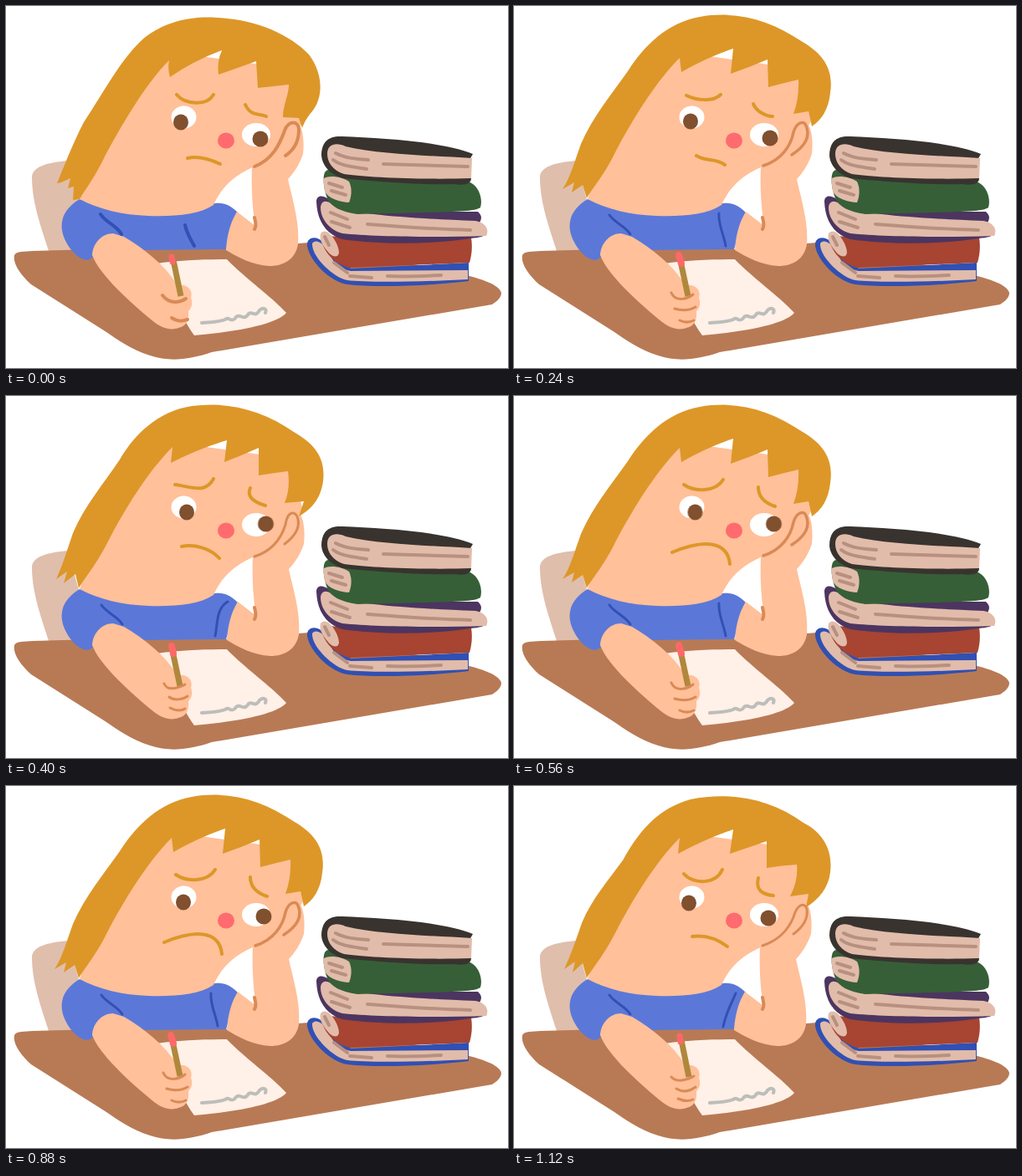
An HTML page without scripts that plays this animation: 600 px wide and 433 px high, repeating every 1200 ms.

```html
<!DOCTYPE html>
<html lang="en">
<head>
<meta charset="utf-8">
<title>Tired student</title>
<style>
html, body { margin: 0; width: 100%; height: 100%; overflow: hidden; background: #fff; }
svg { display: block; width: 100vw; height: 100vh; }
.skin { fill: #ffc09a; }
.hair { fill: #dd9728; }
.page { fill: #e2bcaa; }
.line { fill: none; stroke-linecap: round; stroke-linejoin: round; stroke-width: 4; }
.print { stroke: #b8907f; }
.fold { stroke: #3350b5; stroke-width: 3; }
.crease { stroke: #d98a55; }
.brow { stroke: #dd9728; }
.pencil { stroke: #b0883c; stroke-width: 7; stroke-linecap: butt; }
.rubber { stroke: #ff6868; stroke-width: 8; }

/* four hand-drawn poses take turns, 80 ms each */
.pose { visibility: hidden; animation: 1.2s step-end infinite; }
#p1 { animation-name: p1; }
#p2 { animation-name: p2; }
#p3 { animation-name: p3; }
#p4 { animation-name: p4; }
@keyframes p1 {
  0%, 26.66%, 53.33%, 80% { visibility: visible; }
  6.66%, 33.33%, 60%, 86.66%, 100% { visibility: hidden; }
}
@keyframes p2 {
  6.66%, 33.33%, 60%, 86.66% { visibility: visible; }
  0%, 13.33%, 40%, 66.66%, 93.33%, 100% { visibility: hidden; }
}
@keyframes p3 {
  13.33%, 40%, 66.66%, 93.33% { visibility: visible; }
  0%, 20%, 46.66%, 73.33%, 100% { visibility: hidden; }
}
@keyframes p4 {
  20%, 46.66%, 73.33% { visibility: visible; }
  0%, 26.66%, 53.33%, 80%, 100% { visibility: hidden; }
}

/* face parts move between key poses in 80 ms steps */
.move { animation: 1.2s infinite; }
#mouth { animation-name: mouth; }
#browL { animation-name: browL; }
#browR { animation-name: browR; }
#pupilL { animation-name: pupilL; }
#pupilR { animation-name: pupilR; }
@keyframes mouth {
  0% { d: path("M217 182C230 179 243 183 256 189"); animation-timing-function: steps(3); }
  20% { d: path("M218 179C231 187 239 181 252 190"); animation-timing-function: steps(2); }
  33.33% { d: path("M210 180C225 177 244 182 255 194"); animation-timing-function: steps(2); }
  46.66% { d: path("M189 187C225 172 255 172 258 201"); animation-timing-function: steps(2); }
  60% { d: path("M193 186C225 170 258 171 258 203"); animation-timing-function: steps(2); }
  73.33% { d: path("M189 187C225 172 255 172 258 201"); animation-timing-function: steps(3); }
  93.33%, 100% { d: path("M213 180C228 178 243 183 255 192"); animation-timing-function: step-end; }
}
@keyframes browL {
  0% { d: path("M204 106C214 118 240 120 248 106"); animation-timing-function: steps(3); }
  20% { d: path("M206 107C218 113 238 115 247 106"); animation-timing-function: steps(2); }
  33.33% { d: path("M202 106C220 108 238 118 248 99"); animation-timing-function: steps(2); }
  46.66% { d: path("M203 106C216 115 241 115 250 100"); animation-timing-function: steps(2); }
  60% { d: path("M202 106C220 108 238 118 248 99"); animation-timing-function: steps(2); }
  73.33% { d: path("M203 106C216 115 241 115 250 100"); animation-timing-function: steps(3); }
  93.33%, 100% { d: path("M203 105C214 118 241 118 249 100"); animation-timing-function: step-end; }
}
@keyframes browR {
  0% { d: path("M286 118C293 133 303 128 311 132"); animation-timing-function: steps(3); }
  20% { d: path("M286 117C289 125 300 132 309 132"); animation-timing-function: steps(2); }
  33.33% { d: path("M292 110C286 123 303 129 310 131"); animation-timing-function: steps(2); }
  46.66%, 73.33% { d: path("M292 109C292 123 303 129 312 132"); animation-timing-function: steps(3); }
  93.33%, 100% { d: path("M292 110C288 126 299 130 310 131"); animation-timing-function: step-end; }
}
@keyframes pupilL {
  0% { transform: translate(209px, 139px); animation-timing-function: steps(3); }
  20% { transform: translate(211px, 138px); animation-timing-function: steps(2); }
  33.33% { transform: translate(216px, 139px); animation-timing-function: steps(2); }
  46.66%, 60% { transform: translate(216.5px, 139px); animation-timing-function: steps(2); }
  73.33% { transform: translate(212px, 139px); animation-timing-function: steps(3); }
  93.33%, 100% { transform: translate(209px, 140px); animation-timing-function: step-end; }
}
@keyframes pupilR {
  0% { transform: translate(304px, 159px); animation-timing-function: steps(3); }
  20% { transform: translate(306px, 158px); animation-timing-function: steps(2); }
  33.33%, 46.66%, 60% { transform: translate(310.5px, 153px); animation-timing-function: steps(2); }
  73.33% { transform: translate(308px, 156px); animation-timing-function: steps(3); }
  93.33%, 100% { transform: translate(304px, 158px); animation-timing-function: step-end; }
}
</style>
</head>
<body>
<svg viewBox="0 0 600 433" preserveAspectRatio="none">
  <defs>
    <path id="arm" class="skin" d="M300 188L345 136C355 139 358 157 356 177C352 189 345 200 338 207C343 230 352 258 350 285C347 303 333 311 316 311C296 310 277 300 264 292C265 275 269 259 277 246L299 263C295 240 294 215 295 192Z"/>
    <path id="elbow" class="line crease" stroke-width="3" d="M297 253C298 258 300 263 297 267"/>
  </defs>

  <path fill="#e0beac" d="M31 205C31 192 50 187 74 185L104 293L51 293C42 265 31 235 31 205Z"/>
  <path fill="#b87a55" d="M10 298C12 293 22 294 32 293L104 291L262 291L362 283L540 320C570 326 590 334 592 343C592 349 587 353 581 357L246 414C220 423 195 426 172 418C150 411 133 399 120 390L30 333C17 321 8 308 10 298Z"/>
  <path fill="#fff0e8" d="M180 308C205 304 240 303 264 303C285 325 318 348 335 367C322 382 270 390 225 394C215 380 203 358 193 332Z"/>
  <path class="line" stroke="#bdbdba" d="M234 379C245 378 255 378 262 375C267 370 269 381 275 372C280 367 284 378 290 368C295 365 298 373 303 364C307 360 312 362 310 367"/>

  <g id="books">
    <path fill="#3050b3" d="M360 287C359 276 371 274 380 283L412 314L553 307L553 329C505 335 440 337 408 333C388 330 363 306 360 287Z"/>
    <path class="page" d="M366 284C370 277 382 285 387 297C392 309 401 315 412 317L552 316L552 327C500 330 430 331 408 328C392 325 365 300 366 284Z"/>
    <path fill="#a74432" d="M376 274L470 283L556 277C558 290 556 300 554 307L460 311L410 313C393 308 378 295 376 274Z"/>
    <path class="page" d="M376 272C384 262 398 284 398 295C397 303 388 299 384 293C379 287 374 280 376 272Z"/>
    <path fill="#4c3560" d="M371 234C371 225 381 225 391 236L420 246L564 246C571 252 567 257 565 261L574 270C573 276 566 277 555 278C510 285 450 286 402 279C385 274 372 260 371 234Z"/>
    <path class="page" d="M376 241C377 230 386 233 396 241C420 249 480 254 561 257C573 259 578 267 574 275C510 277 440 276 402 272C386 268 376 254 376 241Z"/>
    <path fill="#365f38" d="M381 199C384 193 395 195 406 205L555 211C566 217 570 231 567 241C558 247 530 246 420 249C400 246 388 240 384 230C380 220 378 206 381 199Z"/>
    <path class="page" d="M379 207C383 202 401 203 410 210C414 218 413 228 410 235C400 235 385 230 381 222Z"/>
    <path fill="#39332f" d="M377 179C377 162 386 155 402 156C450 158 522 162 558 177L554 184L556 206C556 213 548 215 535 213C500 215 420 208 402 206C387 201 378 191 377 179Z"/>
    <path class="page" d="M384 177C384 164 396 163 406 168C450 178 510 179 557 182L556 206C500 208 430 205 404 201C391 197 384 187 384 177Z"/>
    <path class="line print" d="M394 176C405 182 418 183 433 184M451 189L552 192M391 184C400 191 412 192 431 195M386 212L402 217M389 221L406 226M388 247L408 255M432 261C470 264 515 267 555 268M389 258L411 265M381 276L386 286M392 307L408 319M411 323L437 325M456 323C475 324 500 323 520 322"/>
  </g>

  <path fill="#5b78d8" d="M88 231C71 241 63 256 68 273C73 289 86 304 98 304L130 285L160 292L263 291L277 247C268 238 260 235 250 236L170 248Z"/>
  <path class="skin" d="M196 55L340 75L355 138L330 183L297 192C270 203 256 220 248 238C230 250 200 252 170 251C140 250 110 243 88 231L112 160Z"/>
  <path class="skin" d="M103 298C104 283 115 272 128 272L141 276C165 290 189 309 205 334C217 332 224 340 221 349C224 357 221 362 218 365C219 375 216 383 206 385C196 389 185 384 177 378C150 356 112 322 103 298Z"/>

  <g id="p1" class="pose">
    <use href="#arm" x="-1"/><use href="#elbow"/>
    <path class="hair" d="M61 212C72 185 82 160 93 139C120 98 135 68 160 43C188 17 225 12 252 14C300 16 340 35 362 58C380 82 379 110 366 126C360 133 357 138 354 146L350 134L331 133C331 118 338 107 338 94Q320 96 301 98L299 66Q280 73 254 82Q252 66 258 53Q225 65 196 85Q193 75 195 65C165 95 137 145 118 180C108 202 95 219 88 231L80 232L81 216L74 218L77 206L66 211Z"/>
    <path class="line crease" stroke-width="5" d="M297 192C318 184 327 166 333 149C338 136 350 137 350 148C350 161 346 171 334 179"/>
    <path class="line fold" style="stroke-width:4" d="M113 249C120 260 132 262 138 273M214 262C216 272 221 280 225 287"/>
    <path class="line pencil" d="M200 304L209 347"/>
    <path class="line rubber" style="stroke-width:7" d="M198 300L199 306"/>
    <path class="line crease" d="M187 346C196 358 209 354 215 350M198 373C206 378 211 377 217 375"/>
  </g>

  <g id="p2" class="pose">
    <use href="#arm"/><use href="#elbow"/>
    <path class="hair" d="M60 219C68 202 73 184 80 164C94 131 116 106 136 76C153 47 181 18 222 12C264 6 307 17 344 43C372 59 382 77 379 102C376 124 364 136 350 144L356 126L333 128Q340 111 337 90Q320 92 302 95L302 62Q282 71 261 79L264 53Q232 62 197 80L199 61C169 91 141 137 122 174C108 202 95 216 87 230L83 213L69 224L73 210Z"/>
    <path class="line crease" stroke-width="3" style="stroke-width:3" d="M297 192C319 185 329 170 334 154C336 140 343 136 348 144C353 157 345 168 333 177"/>
    <path class="line fold" d="M114 250C121 260 133 263 139 273M265 246C251 254 253 273 250 287"/>
    <path class="line pencil" d="M199 305L208 347"/>
    <path class="line rubber" d="M198 299L200 308"/>
    <path class="line crease" style="stroke-width:3" d="M189 344C193 354 207 349 214 345M195 360C200 364 210 364 217 359M196 373C202 376 208 378 214 374"/>
  </g>

  <g id="p3" class="pose">
    <use href="#arm" x="-1"/><use href="#elbow"/>
    <path class="hair" d="M60 219C68 202 74 184 81 164C93 135 114 111 130 89C149 55 171 27 211 16C260 6 307 16 346 44C371 57 381 78 378 103C376 122 364 136 349 145L352 129L330 132Q340 113 338 94Q320 95 302 98L302 66Q282 73 258 81L262 52Q230 63 196 81L198 62C169 91 140 139 122 174C108 202 95 216 87 230L82 212L70 223L73 210Z"/>
    <path class="line crease" style="stroke-width:3" d="M297 191C318 184 329 169 334 157C338 142 347 138 350 147C352 160 345 169 334 177"/>
    <path class="line fold" d="M114 250C121 260 133 263 139 273M265 248C259 262 253 272 250 288"/>
    <path class="line pencil" d="M200 304L209 348"/>
    <path class="line rubber" style="stroke-width:7" d="M198 299L199 306"/>
    <path class="line crease" style="stroke-width:3" d="M188 348C194 355 207 352 215 347M194 362C202 367 210 365 217 360M196 374C203 377 208 378 214 375"/>
  </g>

  <g id="p4" class="pose">
    <use href="#arm"/><use href="#elbow"/>
    <path class="hair" d="M58 219C68 204 73 184 80 165C94 133 116 106 136 78C156 47 183 20 222 13C266 5 307 17 345 43C372 59 382 78 378 104C376 124 367 137 356 144L352 126L334 129Q341 110 340 88Q323 92 304 97L303 64Q282 73 259 81L262 51Q232 61 200 79L198 62C168 92 140 139 121 175C108 202 95 216 87 230L82 214L69 223L72 211Z"/>
    <path class="line crease" style="stroke-width:3.5" d="M298 191C320 184 331 167 334 151C338 138 347 137 349 143C355 157 346 169 332 178"/>
    <path class="line fold" d="M114 250C121 260 133 263 139 273M245 248C244 262 251 274 253 287"/>
    <path class="line pencil" d="M199 305L208 347"/>
    <path class="line rubber" d="M197 298L200 308"/>
    <path class="line crease" style="stroke-width:3" d="M188 343C193 355 208 350 214 345M192 362C202 365 210 364 217 360M198 376C204 379 209 379 215 376"/>
  </g>

  <g id="face">
    <ellipse cx="212.5" cy="133" rx="15" ry="13.5" fill="#fff"/>
    <ellipse cx="299" cy="154" rx="17" ry="14" fill="#fff"/>
    <ellipse id="pupilL" class="move" rx="9" ry="9.5" fill="#80502f"/>
    <ellipse id="pupilR" class="move" rx="9.5" ry="9.5" fill="#80502f"/>
    <ellipse cx="263" cy="161" rx="10" ry="9.5" fill="#ff6b6e"/>
    <path id="browL" class="line brow move" d="M204 106C214 118 240 120 248 106"/>
    <path id="browR" class="line brow move" d="M286 118C293 133 303 128 311 132"/>
    <path id="mouth" class="line brow move" d="M217 182C230 179 243 183 256 189"/>
  </g>
</svg>
</body>
</html>
```
